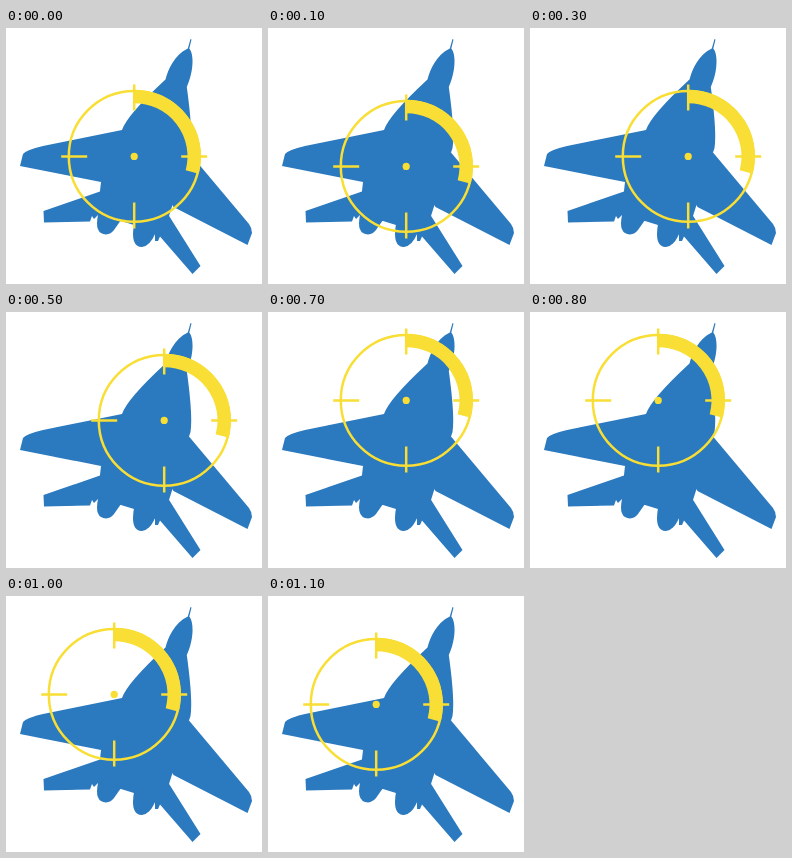
These frames come from a looping animation (256 by 256 pixels, 1200 ms). An HTML page:

```html
<!DOCTYPE html>
<html lang="en">
<head>
<meta charset="utf-8">
<title>Jet in sight</title>
<style>
  html, body { margin: 0; width: 100%; height: 100%; overflow: hidden; background: #fff; }
  svg { display: block; width: 100vw; height: 100vh; }
</style>
</head>
<body>
<svg viewBox="0 0 256 256">
  <g fill="#2b79be">
    <!-- fuselage -->
    <path d="M184.500 11L185.500 11.500L183.300 20.500C188 26 188 43 180.800 59Q187 104 184.500 120L183 124.500
      L163 188L148 207L128 197L115 193L92 188L94 163L95 154L116 102Q121 87 159.500 51.500C162 42 168 27 181.800 20.500Z"/>
    <!-- wings -->
    <path d="M116 102L37 118Q20 122 17 126L14 138L95 154L130 130Z"/>
    <path d="M183 124.500L243 196Q246 200 246 205L241.500 217L167.500 179L150 150Z"/>
    <!-- tail fins -->
    <path d="M94 163.500L37.500 183L38 194.500L84 193.500L86 188L88 191L92 187L110 180Z"/>
    <path d="M162.500 187L194.500 238L186.500 246L154 208.500L152 213H149V200Z"/>
    <!-- nozzles -->
    <path d="M92 187Q88 206 100 206.500Q105 206 108 202L115 192Z"/>
    <path d="M128 196Q124 219 136 219Q144 218 149 206Z"/>
  </g>
  <g id="sight" fill="none" stroke="#f8de35" stroke-width="2.500">
    <circle r="65.400"/>
    <path d="M0-72V-46M0 46V72M-73 0H-47M47 0H73"/>
    <path stroke-width="13.500" d="M0-60A60 60 0 0 1 58 15.500"/>
    <circle r="3.600" fill="#f8de35" stroke="none"/>
  </g>
</svg>
<script>
  const sight = document.getElementById('sight');
  const stepMs = 100, steps = 12, stride = 10;
  const clamp = (v, lo, hi) => Math.min(Math.max(v, lo), hi);

  // The sight walks around a square with cut corners, one stride per step
  function draw() {
    const walked = Math.floor(performance.now() / stepMs) % steps * stride;
    const x = clamp(Math.min(128 + walked, 208 - walked), 108, 158);
    const y = clamp(Math.min(128 + walked, Math.max(158 - walked, walked - 2)), 88, 138);
    sight.setAttribute('transform', `translate(${x + 0.2} ${y + 0.4})`);
    requestAnimationFrame(draw);
  }
  draw();
</script>
</body>
</html>
```
